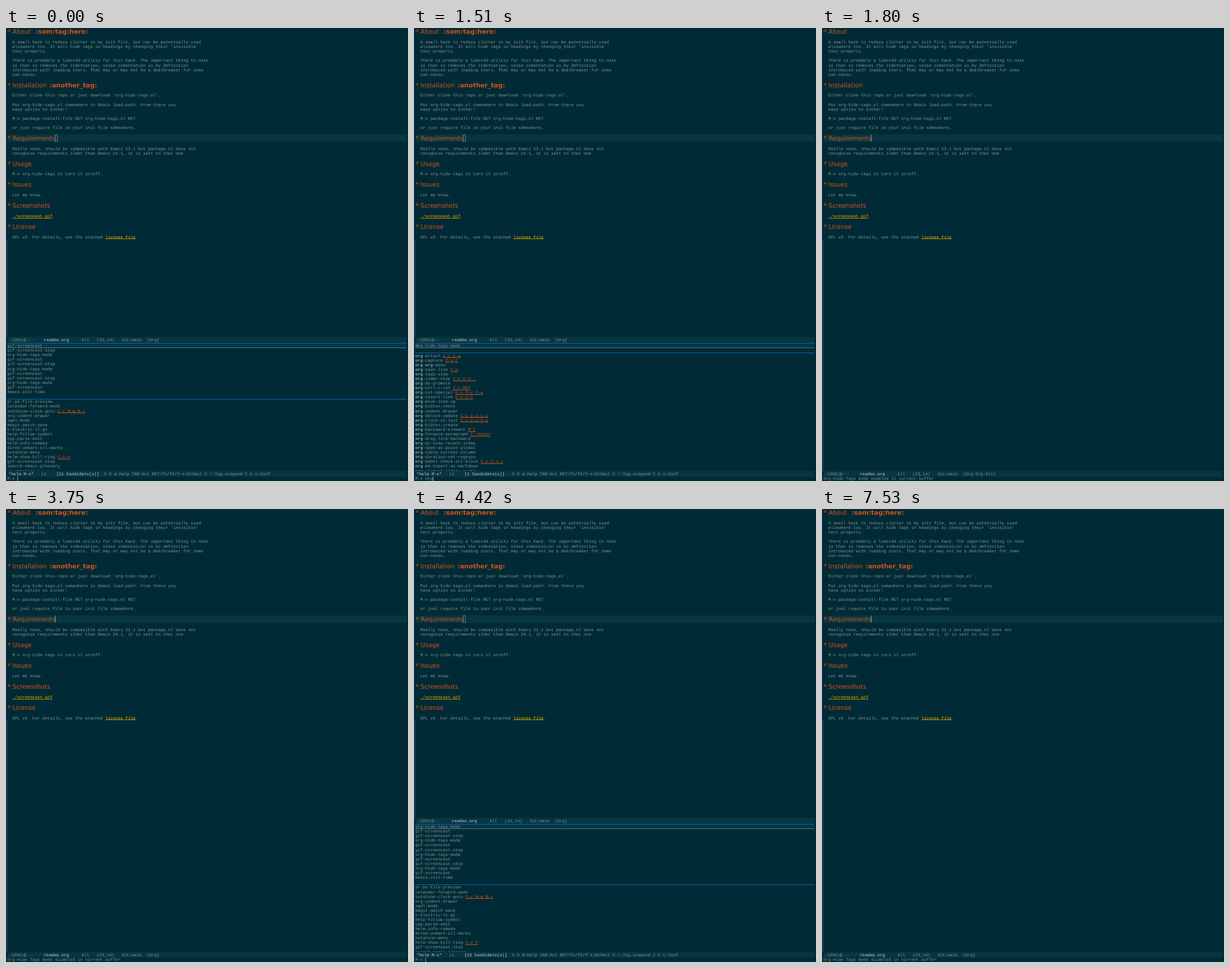
Write an HTML page with a canvas that moves like this. It is 706x794 px and loops after 8000 ms.

```html
<!DOCTYPE html>
<html lang="en">
<head>
<meta charset="utf-8">
<title>org-hide-tags</title>
<style>
html, body { margin: 0; width: 100%; height: 100%; overflow: hidden; background: #002b36; }
canvas { display: block; }
</style>
</head>
<body>
<canvas id="stage" width="706" height="794"></canvas>
<script>
const ctx = document.getElementById('stage').getContext('2d');
const LOOP = 8000, CELL = 4.417, ROW = 8.08, HEADING_ROW = 12.46, LEFT = 2.2, RIGHT = 703;
const BG = '#002b36', BAR = '#073642', FG = '#839496', BRIGHT = '#93a1a1';
const ORANGE = '#d65018', YELLOW = '#b58900', BLUE = '#0c67b8';
const MONO = '7.36px "Liberation Mono", monospace';
const SANS = '10.8px "DejaVu Sans", sans-serif';
const TAG = 'bold 11px "DejaVu Sans", sans-serif';

// Links are written as [text].
const sections = [
  { title: 'About', tag: ':som:tag:here:', tagX: 52, lines: [
    "A small hack to reduce clutter in my init file, but can be potentially used",
    "elsewhere too. It will hide tags in headings by changing their 'invisible'",
    "text property.",
    "",
    "There is probably a limited utility for this hack. The important thing to note",
    "is that is removes the indentation, since indentation is by definition",
    "introduced with leading stars. That may or may not be a dealbreaker for some",
    "use-cases."] },
  { title: 'Installation', tag: ':another_tag:', tagX: 76.3, lines: [
    "Either clone this repo or just download 'org-hide-tags.el'.",
    "",
    "Put org-hide-tags.el somewhere in Emacs load-path. From there you",
    "have option to either:",
    "",
    "M-x package-install-file RET org-hide-tags.el RET",
    "",
    "or just require file in your init file somewhere."] },
  { title: 'Requirements', current: true, lines: [
    "Really none, should be compatible with Emacs 22.1 but package.el does not",
    "recognize requirements older than Emacs 24.1, it is satt to that one."] },
  { title: 'Usage', lines: ["M-x org-hide-tags to turn it on/off."] },
  { title: 'Issues', lines: ["Let me know."] },
  { title: 'Screenshots', lines: ["[./screencast.gif]"] },
  { title: 'License', lines: ["GPL v3. For details, see the atached [license file]."] }
];

const MODE = 'org-hide-tags-mode';
const cycle = ['gif-screencast', 'gif-screencast-stop', MODE];
const oldHistory = [...cycle, ...cycle, ...cycle, 'gif-screencast', 'emacs-init-time'];
const newHistory = [MODE, ...oldHistory];

// Key bindings follow the command name after a space.
const allCommands = `pr-ps-file-preview
calendar-forward-week
outshine-clock-goto C-c M-m M-j
org-indent-drawer
sgml-mode
magit-patch-save
c-electric-lt-gt
help-follow-symbol
cpp-parse-edit
helm-info-remake
dired-unmark-all-marks
outshine-menu
helm-show-kill-ring C-z k
gif-screencast-stop
search-emacs-glossary
vc-annotate C-x v g`.split('\n');

const orgCommands = `org-attach C-c C-a
org-capture C-v c
org-org-menu
org-open-line C-o
org-tags-view
org-timer-stop C-c C-x _
org-do-promote
org-ctrl-c-ret C-c RET
org-cut-special C-c C-x C-w
org-insert-link C-c C-l
org-move-item-up
org-bibtex-check
org-indent-drawer
org-dblock-update C-c C-x C-u
org-clock-in-last C-c C-x C-x
org-bibtex-create
org-backward-element M-{
org-forward-paragraph C-<down>
org-drag-line-backward
org-ql-view-recent-items
org-open-at-point-global
org-table-current-column
org-duration-set-regexps
org-babel-check-src-block C-c C-v c
org-md-export-as-markdown
org-element-update-syntax`.split('\n');

const opened = { history: oldHistory, commands: allCommands, input: '' };
const typed = { history: [MODE], commands: orgCommands, input: 'or', match: 'or' };
const reopened = { history: newHistory, commands: allCommands, input: '' };
const message = state => `Org-Hide-Tags mode ${state} in current buffer`;
const disabled = { at: 3750, echo: message('disabled') };

const steps = [
  { at: 0, helm: opened },
  { at: 1000, helm: typed },
  { at: 1350, helm: { ...typed, input: 'org' } },
  { at: 1510, helm: { ...typed, input: 'org', match: 'org' } },
  { at: 1800, hidden: true, echo: message('enabled') },
  { at: 2250, hidden: true, helm: reopened },
  disabled,
  { at: 4420, helm: reopened },
  { at: 5600, helm: reopened, echo: message('enabled') },
  { at: 6100, hidden: true, helm: reopened },
  { ...disabled, at: 7530 }
];

function rect(x, y, w, h, color) {
  ctx.fillStyle = color;
  ctx.fillRect(x, y, w, h);
}

function rule(y, color) {
  rect(2.5, Math.round(y), RIGHT - 2.5, 1, color);
}

function text(str, x, y, color = FG, font = MONO) {
  ctx.font = font;
  ctx.fillStyle = color;
  ctx.fillText(str, x, y);
}

// Draws on the character grid and returns the x where the next run begins.
function mono(str, x, y, { color = FG, bold = false, underline = false } = {}) {
  text(str, x, y, color, (bold ? 'bold ' : '') + MONO);
  const width = str.length * CELL;
  if (underline) rect(x, Math.round(y + 0.8), width, 1, color);
  return x + width;
}

function drawDocument(hidden, helmOpen) {
  let y = 0.2;
  for (const { title, tag, tagX, current, lines } of sections) {
    if (current) {
      rect(2.5, 186.5, RIGHT - 2.5, 13, BAR);
      if (helmOpen) {
        ctx.strokeStyle = FG;
        ctx.lineWidth = 0.8;
        ctx.strokeRect(86.5, 187, 3.6, 12);
      } else {
        rect(86, 187, 1, 12, BRIGHT);
      }
    }
    const baseline = Math.round(y + 10.2);
    text('* ' + title, LEFT + 0.5, baseline, ORANGE, SANS);
    if (tag && !hidden) text(tag, tagX, baseline, ORANGE, TAG);
    y += HEADING_ROW + ROW;
    for (const line of lines) {
      let x = LEFT + 2 * CELL;
      line.split(/[[\]]/).forEach((part, i) => {
        x = mono(part, x, y + 6.4, i % 2 ? { color: YELLOW, bold: true, underline: true } : {});
      });
      y += ROW;
    }
    y += ROW;
  }
}

function drawFringe(bottom) {
  for (let y = 371; y < bottom; y += 2) rect(1, y, 1.2, 1, '#52696f');
}

function drawModeLine(top, parts) {
  rect(2.5, top, RIGHT - 2.5, 10, BAR);
  for (const [col, str, bold] of parts) {
    mono(str, 4.5 + col * CELL, top + 7.8, { bold, color: bold ? BRIGHT : FG });
  }
}

function drawCandidate(entry, y, match, active) {
  const space = entry.indexOf(' ');
  const name = space < 0 ? entry : entry.slice(0, space);
  let x = LEFT;
  name.split(match ? new RegExp(`(${match})`) : /$^/).forEach((part, i) => {
    const matched = i % 2 === 1;
    x = mono(part, x, y + 6.4, { bold: active || matched, color: matched ? BRIGHT : FG });
  });
  if (space > 0) {
    mono(entry.slice(space + 1), x + CELL, y + 6.4, { color: ORANGE, underline: true });
  }
}

function drawHelm({ history, commands, match }, hidden) {
  let y = 552.7;
  rule(552, BLUE);
  rect(2.5, 553, RIGHT - 2.5, 7, BAR);
  rule(560, '#5f7a80');
  for (const entry of history) {
    drawCandidate(entry, y, match && 'or', hidden && entry === MODE);
    y += ROW;
  }
  y += ROW;
  rule(y, BLUE);
  y += 1.3;
  for (const entry of commands) {
    drawCandidate(entry, y, match);
    y += ROW;
  }
  rect(0, 776.4, 706, 18, BG);
  drawModeLine(776.4, [
    [0, '*helm M-x*', true],
    [13, 'L1'],
    [19, `[${history.length} Candidate(s)]`, true],
    [38, 'C-h m:Help TAB:Act RET/f1/f2/f-n:NthAct C-!:Tog.suspend C-h c:Conf']
  ]);
}

function draw({ hidden = false, helm, echo }) {
  rect(0, 0, 706, 794, BG);
  const modeTop = helm ? 541.5 : 776.4;
  drawDocument(hidden, Boolean(helm));
  drawFringe(modeTop);
  if (helm) drawHelm(helm, hidden);
  drawModeLine(modeTop, [
    [0, '-(DOS)@---'],
    [14, 'readme.org', true],
    [29, 'All   (23,14)   Git:main  ' + (hidden ? '(Org Org-hls)' : '(Org)')]
  ]);
  if (echo) {
    mono(echo, LEFT, 792.3);
  } else {
    const x = mono('M-x ' + helm.input, LEFT, 792.3);
    rect(Math.round(x), 786, 1, 8, BRIGHT);
  }
}

ctx.textRendering = 'geometricPrecision';
const start = performance.now();
function tick() {
  const time = (performance.now() - start) % LOOP;
  draw(steps.findLast(step => step.at <= time));
  requestAnimationFrame(tick);
}
tick();
</script>
</body>
</html>
```
